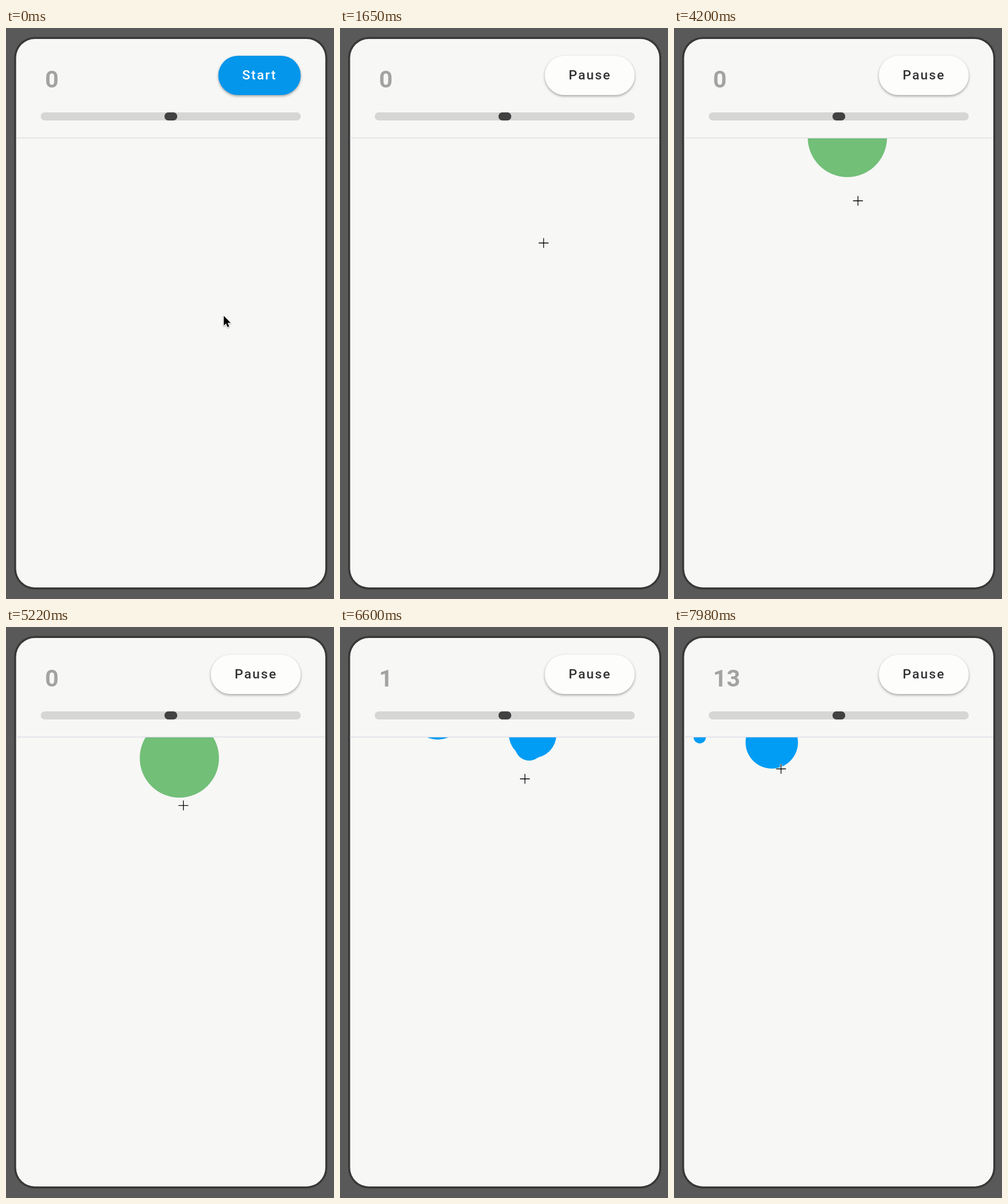
An HTML page with a canvas for the animation above (8 s loop, 567 by 988 pixels).

```html
<!DOCTYPE html>
<html lang="en">
<head>
<meta charset="utf-8">
<title>Dot game</title>
<style>
  html, body { margin: 0; width: 100%; height: 100%; overflow: hidden; background: #595959; }
  canvas { display: block; }
</style>
</head>
<body>
<canvas id="stage" width="567" height="988"></canvas>
<script>
const ctx = document.getElementById('stage').getContext('2d');
const LOOP = 8000, START = 575, FADE = 280, SHRINK = 300, FALL = 0.0365;
const HEADER = 191;
const GREEN = '#72bf78', BLUE = '#019df4', GREY = '#c4c4c4';

// top: upper edge at time 0. A hit dot shrinks towards pull (-1..1 per axis), flatten speeds up its height.
const dots = [
  { x: 299.7, r: 68.5, top: -32.3, color: GREEN, hit: 5850, points: 1, pull: [-1, -1], flatten: 1 },
  { x: 327, r: 24.5, top: -58.7, color: BLUE, hit: 7230, points: 7, pull: [-1, -1], flatten: 1 },
  { x: 333, r: 41, top: -96, color: BLUE, hit: 7060, points: 5, pull: [0.93, -0.24], flatten: 1.53 },
  { x: 44.5, r: 10.7, top: -111.2, color: BLUE },
  { x: 169, r: 45.3, top: -136.9, color: BLUE }
];

// Pointer stops: time, x, y
const stops = [
  [0, 376, 497], [120, 376, 497], [540, 448, 87.5], [850, 448, 87.5],
  [1650, 352, 372], [2940, 346, 376], [4200, 318, 299], [5700, 303, 312],
  [6050, 303, 312], [6950, 328, 238], [7170, 326.5, 240],
  [7320, 326, 241], [7940, 185, 245.5], [8000, 185, 245.5]
];

const clamp = v => Math.max(0, Math.min(1, v));
const ease = v => v * v * (3 - 2 * v);
const mix = (a, b, k) => a + (b - a) * k;
const blend = (a, b, k) => `rgb(${a.map((v, i) => Math.round(mix(v, b[i], k)))})`;

function pointerAt(t) {
  const i = Math.max(1, stops.findIndex(s => s[0] > t));
  const [t0, x0, y0] = stops[i - 1], [t1, x1, y1] = stops[i];
  const k = ease((t - t0) / (t1 - t0));
  return { x: mix(x0, x1, k), y: mix(y0, y1, k) };
}

function box(x, y, w, h, r, fill) {
  ctx.beginPath();
  ctx.roundRect(x, y, w, h, r);
  ctx.fillStyle = fill;
  ctx.fill();
}

function label(text, x, y, size, color, weight, spacing = 0) {
  ctx.font = `${weight} ${size}px Roboto, sans-serif`;
  ctx.letterSpacing = spacing + 'px';
  ctx.fillStyle = color;
  ctx.fillText(text, x, y);
}

function dotAt(dot, t) {
  const { x, r, top, color, hit, pull: [px, py] = [0, 0], flatten } = dot;
  const gone = hit ? clamp((t - hit) / SHRINK) : 0;
  const rx = r * (1 - gone);
  const ry = hit ? r * clamp(1 - gone * flatten) : r;
  return { x: x + px * (r - rx), y: top + r + FALL * t + py * (r - ry), rx, ry, color };
}

function drawDots(t, pointer) {
  const visible = dots.map(d => dotAt(d, t)).filter(d => d.ry > 0);
  const hovered = pointer.y > HEADER && visible.findLast(d =>
    Math.hypot((pointer.x - d.x) / d.rx, (pointer.y - d.y) / d.ry) < 1);

  ctx.save();
  ctx.beginPath();
  ctx.rect(18, HEADER, 534, 777);
  ctx.clip();
  for (const d of visible) {
    ctx.beginPath();
    ctx.ellipse(d.x, d.y, d.rx, d.ry, 0, 0, 2 * Math.PI);
    ctx.fillStyle = d === hovered ? GREY : d.color;
    ctx.fill();
  }
  ctx.restore();
}

function drawButton(t, hover) {
  const playing = t >= START;
  const k = ease(clamp((t - START) / FADE));
  const left = playing ? 354 : 367;
  ctx.save();
  ctx.shadowColor = `rgba(0,0,0,${hover ? 0.45 : 0.35})`;
  ctx.shadowBlur = hover ? 8 : 4;
  ctx.shadowOffsetY = hover ? 3 : 2;
  box(left, 48, 509.5 - left, 68, 34, blend([3, 150, 235], [253, 253, 252], k));
  ctx.restore();
  label(playing ? 'Pause' : 'Start', left + 41.3, 89, 22.8,
    blend([255, 255, 255], [51, 51, 51], k), 500, 2);
}

function drawArrow(x, y) {
  ctx.save();
  ctx.translate(x, y);
  ctx.lineJoin = 'round';
  ctx.shadowColor = 'rgba(0,0,0,.35)';
  ctx.shadowBlur = 2;
  ctx.shadowOffsetY = 1;
  ctx.strokeStyle = '#fff';
  ctx.lineWidth = 2.4;
  ctx.stroke(arrow);
  ctx.shadowColor = 'transparent';
  ctx.fillStyle = '#000';
  ctx.fill(arrow);
  ctx.restore();
}

const arrow = new Path2D('M.5 1V18L4.4 14.3L7 20.4L9.8 19.2L7.2 13.3H12.4Z');
const hand = new Path2D('M-3.5 1Q-1.5-1 0 1.2L3 8V6.2Q4.5 4.8 6 6.5Q8 5.2 9 7Q11.5 6 12.5 8.5L13.5 13Q14 16 12.5 18.5V21H4V19L-2.5 14Q-5 11-3 10.5L0 12Z');
const knuckles = new Path2D('M5 14L6 18M8 13.5L9 18M11 13L11.5 17.5');

function drawHand(x, y) {
  ctx.save();
  ctx.translate(x, y);
  ctx.lineJoin = 'round';
  ctx.fillStyle = '#fff';
  ctx.strokeStyle = '#000';
  ctx.lineWidth = 1.5;
  ctx.fill(hand);
  ctx.stroke(hand);
  ctx.stroke(knuckles);
  ctx.restore();
}

function drawCross(x, y) {
  const path = new Path2D(`M${x - 8.5} ${y}h17M${x} ${y - 8.5}v17`);
  for (const [color, width] of [['#fff', 3.2], ['#000', 1.3]]) {
    ctx.strokeStyle = color;
    ctx.lineWidth = width;
    ctx.stroke(path);
  }
}

function draw(t) {
  const pointer = pointerAt(t);
  const overButton = pointer.x > 355 && pointer.x < 509 && pointer.y > 48 && pointer.y < 116;
  const score = dots.reduce((sum, d) => sum + (t >= d.hit ? d.points : 0), 0);

  ctx.fillStyle = '#595959';
  ctx.fillRect(0, 0, 567, 988);
  box(14, 15.5, 541.5, 956, 36, '#383836');
  box(17.5, 19, 534.5, 949, 32.5, '#f7f7f5');

  drawDots(t, pointer);
  ctx.fillStyle = '#dcdce6';
  ctx.fillRect(17.5, 189.7, 534.5, 1.3);

  label(score, 67.5, 102.5, 41, '#a3a3a3', 700);
  box(60, 146, 449.5, 14, 7, '#d6d6d5');
  box(274, 146, 22, 14, 6.5, '#414141');
  drawButton(t, overButton);

  if (overButton) drawHand(pointer.x, pointer.y);
  else if (t >= START && pointer.y > HEADER) drawCross(pointer.x, pointer.y);
  else drawArrow(pointer.x, pointer.y);
}

function frame() {
  draw(performance.now() % LOOP);
  requestAnimationFrame(frame);
}
frame();
</script>
</body>
</html>
```
